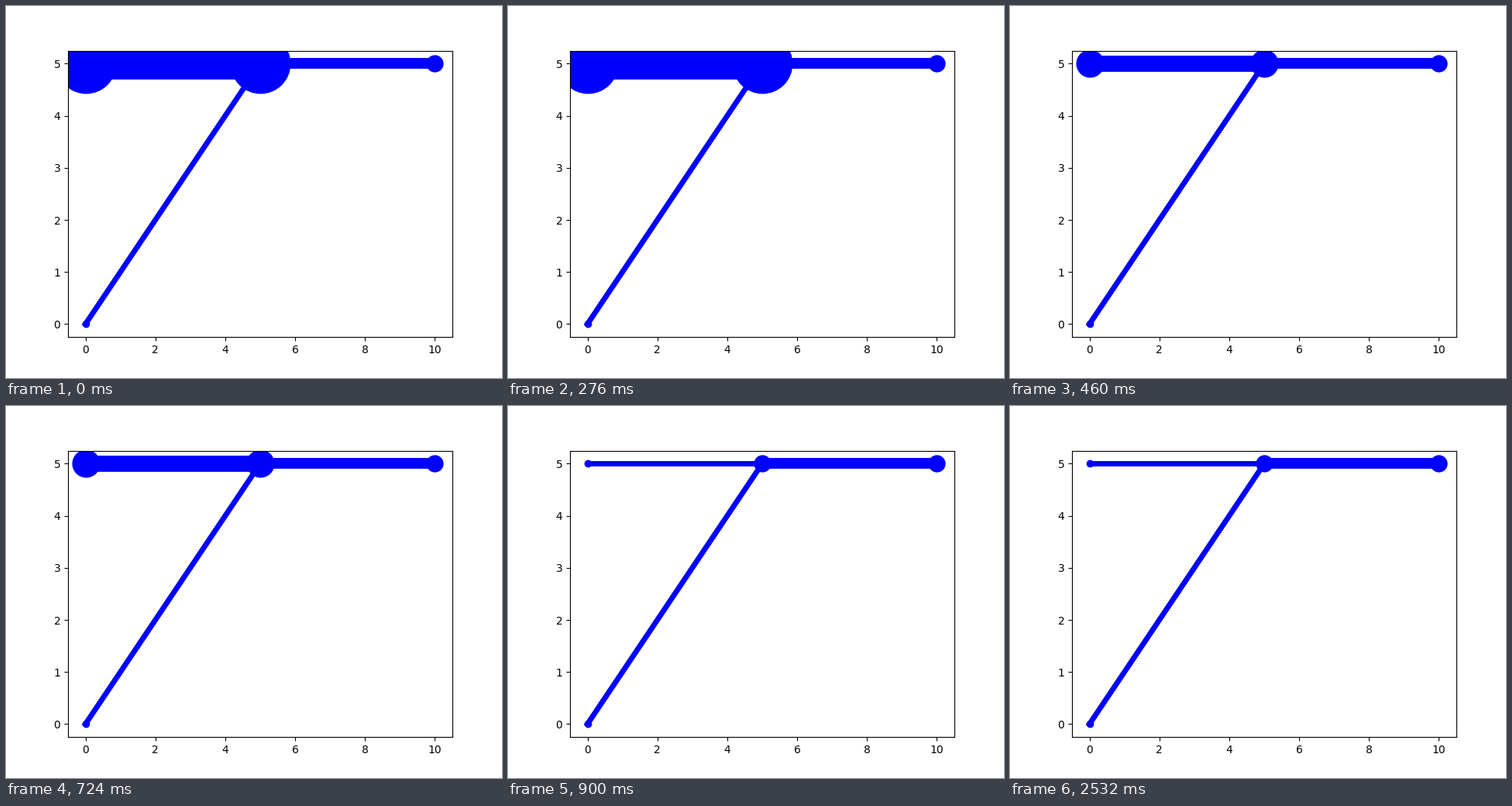
Recreate the animation shown at these times as a matplotlib script. Size 640x480 px, loop 3.62 s.

```python
import matplotlib.pyplot as plt
from matplotlib.animation import FuncAnimation

STEP = 20       # ms per frame
LOOP = 3620     # ms per loop
# (start in ms, line width, marker size) of the upper left link
STAGES = [(0, 30, 55), (460, 15, 25), (900, 5, 6)]

fig, ax = plt.subplots(figsize=(6.4, 4.8), dpi=100)


def link(x, y, width, size):
    return ax.plot(x, y, "o-", color="blue", lw=width, ms=size)[0]


link([0, 5], [0, 5], 5, 6)
link([5, 10], [5, 5], 10, 15)
left = link([0, 5], [5, 5], 30, 55)


def update(i):
    t = i * STEP
    _, width, size = [s for s in STAGES if s[0] <= t][-1]
    left.set_linewidth(width)
    left.set_markersize(size)
    return [left]


anim = FuncAnimation(fig, update, frames=LOOP // STEP, interval=STEP,
                     repeat=True, repeat_delay=0)
plt.show()
```
